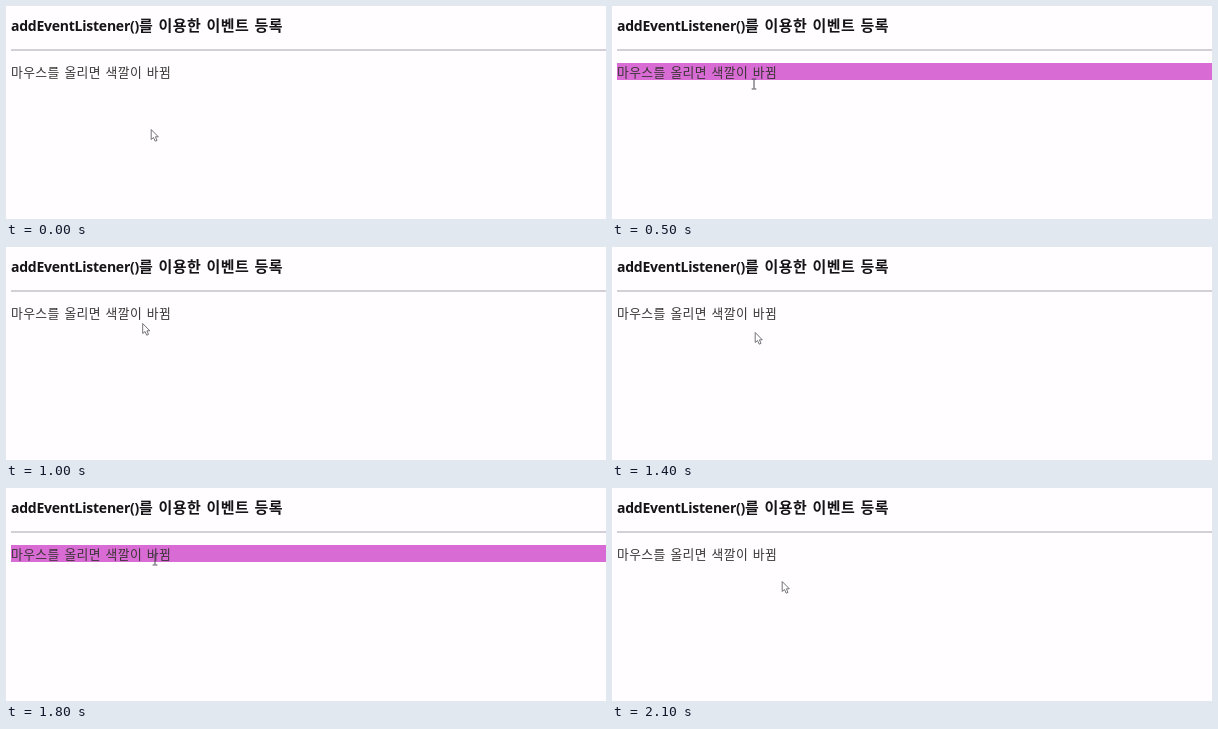
Animation of 600 by 213 pixels, one loop 2200 ms. Source, as an HTML page:

```html
<!DOCTYPE html>
<html lang="ko">
<head>
<meta charset="utf-8">
<title>addEventListener</title>
<style>
  html, body { margin: 0; width: 100%; height: 100%; overflow: hidden; background: #fffdff; }
  svg { display: block; }
  text { font-family: "Noto Sans CJK KR", "Noto Sans CJK", sans-serif; white-space: pre; }
  .title { font-size: 15px; font-weight: 700; fill: #161416; letter-spacing: .4px; word-spacing: .8px; }
  .code { font-family: "Open Sans", "Noto Sans", sans-serif; font-size: 14px; letter-spacing: -.24px; }
  .line { font-size: 12.8px; fill: #3a3434; letter-spacing: .4px; word-spacing: .7px; }
</style>
</head>
<body>
<svg width="600" height="213" viewBox="0 0 600 213">
  <text class="title code" x="5" y="25">addEventListener()</text>
  <text class="title" x="133" y="25">를 이용한 이벤트 등록</text>
  <rect x="5" y="43.5" width="595" height="1" fill="#a8a2b0"/>
  <rect id="band" x="5" y="57" width="595" height="17" fill="#d86cd4"/>
  <text class="line" x="5" y="71">마우스를 올리면 색깔이 바뀜</text>
  <path id="arrow" d="M.2 .5V10.5L2.5 8.5L4.2 12.2L6 11.4L4.4 7.8H7.3Z"
        fill="#fff" stroke="#66646c" stroke-width=".9" stroke-linejoin="round"/>
  <path id="beam" d="M-2.3 -5H-.6L0 -4.5L.6 -5H2.3M0 -4.5V4.5M-2.3 5H-.6L0 4.5L.6 5H2.3"
        fill="none" stroke="#4a4450" stroke-width="1"/>
</svg>
<script>
  const LOOP = 2200;
  // time, pointer shape, x, y, highlighted
  const steps = [
    [0, "arrow", 145, 123, 0],
    [100, "arrow", 145, 121, 0],
    [200, "arrow", 143, 112, 0],
    [300, "arrow", 141, 98, 0],
    [400, "arrow", 139, 82, 0],
    [500, "beam", 142, 78, 1],
    [700, "arrow", 139, 84, 0],
    [800, "arrow", 138, 92, 0],
    [900, "arrow", 137, 88, 0],
    [1000, "arrow", 136.5, 76, 0],
    [1100, "beam", 141, 74, 1],
    [1200, "beam", 142, 73, 1],
    [1300, "beam", 143, 76, 1],
    [1400, "arrow", 143, 85, 0],
    [1500, "arrow", 145, 93, 0],
    [1600, "arrow", 147, 88, 0],
    [1700, "beam", 149, 78, 0],
    [1800, "beam", 149, 72, 1],
    [2000, "beam", 148, 74, 1],
    [2100, "arrow", 170, 93, 0]
  ];
  const el = id => document.getElementById(id);
  const show = (node, on) => node.setAttribute("visibility", on ? "visible" : "hidden");
  const start = performance.now();

  function draw() {
    const t = Math.max(0, performance.now() - start) % LOOP;
    const [, shape, x, y, lit] = steps.filter(s => s[0] <= t).pop();
    show(el("band"), lit);
    for (const id of ["arrow", "beam"]) {
      show(el(id), id === shape);
      el(id).setAttribute("transform", `translate(${x} ${y})`);
    }
    requestAnimationFrame(draw);
  }
  draw();
</script>
</body>
</html>
```
